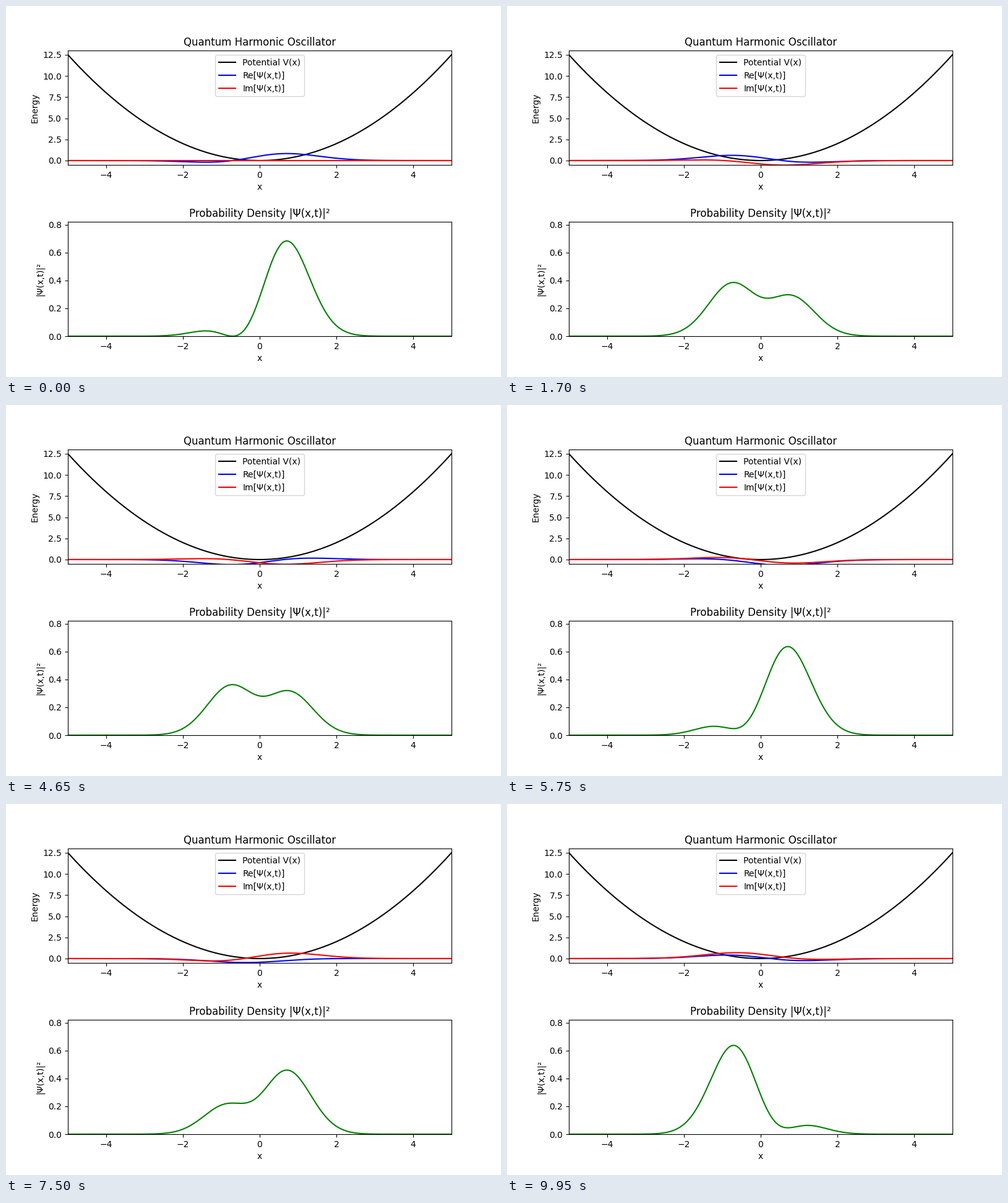
Animation, 800 px wide and 600 px high, one loop 10 s. Source, as a matplotlib script:

```python
import numpy as np
import matplotlib.pyplot as plt
from matplotlib.animation import FuncAnimation

FRAMES = 200
INTERVAL = 50  # ms
DT = 0.05      # time units per frame

x = np.linspace(-5, 5, 500)
ground = np.pi ** -0.25 * np.exp(-x**2 / 2)
excited = np.sqrt(2) * x * ground


def psi(t):
    """Equal mix of the two lowest states at time t."""
    return (ground * np.exp(-0.5j * t) + excited * np.exp(-1.5j * t)) / np.sqrt(2)


def density(t):
    return np.abs(psi(t)) ** 2


plt.rcParams["font.family"] = "DejaVu Sans"
fig, (top, bottom) = plt.subplots(2, 1, figsize=(8, 6), dpi=100)
fig.subplots_adjust(left=0.125, right=0.9, bottom=0.11, top=0.88, hspace=0.5)

potential = x**2 / 2
top.plot(x, potential, color="black", label="Potential V(x)")
real_line, = top.plot(x, psi(0).real, color="blue", label="Re[Ψ(x,t)]")
imag_line, = top.plot(x, psi(0).imag, color="red", label="Im[Ψ(x,t)]")
top.set(xlim=(-5, 5), ylim=(-0.5, potential.max() + 0.5), xlabel="x",
        ylabel="Energy", title="Quantum Harmonic Oscillator")
top.legend(loc="upper center")

density_line, = bottom.plot(x, density(0), color="green")
bottom.set(xlim=(-5, 5), ylim=(0, 1.2 * density(0).max()), xlabel="x",
           ylabel="|Ψ(x,t)|²", title="Probability Density |Ψ(x,t)|²")


def update(frame):
    t = frame * DT
    wave = psi(t)
    real_line.set_ydata(wave.real)
    imag_line.set_ydata(wave.imag)
    density_line.set_ydata(density(t))
    return real_line, imag_line, density_line


anim = FuncAnimation(fig, update, frames=FRAMES, interval=INTERVAL,
                     repeat=True, repeat_delay=0)
plt.show()
```
